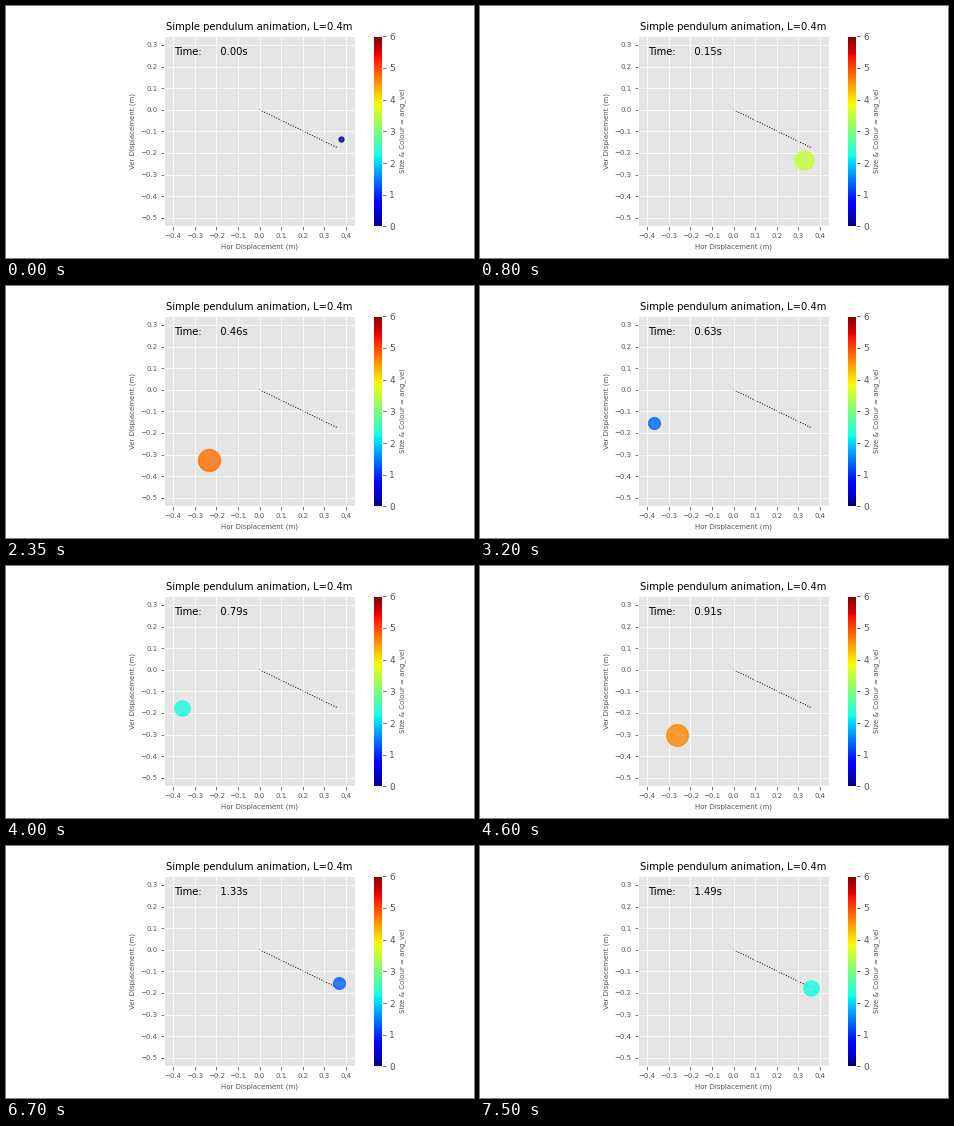
Animation of 468 by 252 pixels, one loop 7.55 s. Source, as a matplotlib script:

```python
import numpy as np
import matplotlib.pyplot as plt
from matplotlib.animation import FuncAnimation
from matplotlib.cm import ScalarMappable
from matplotlib.colors import Normalize
from matplotlib.ticker import MultipleLocator

plt.style.use("ggplot")
plt.rcParams.update({
    "font.family": "DejaVu Sans",
    "figure.subplot.bottom": 0.125,
    "figure.subplot.top": 0.88,
})

G = 9.8
L = 0.4
DT = 0.01
STEPS = 150
START = np.radians(70)
SMALL = 7


def swing():
    """Semi-implicit integration of the pendulum: angles and speeds."""
    angles, speeds = [], []
    theta, omega = START, 0.0
    for _ in range(STEPS):
        theta += omega * DT
        omega -= G / L * np.sin(theta) * DT
        angles.append(theta)
        speeds.append(abs(omega))
    return np.array(angles), np.array(speeds)


angles, speeds = swing()
xs, ys = L * np.sin(angles), -L * np.cos(angles)
norm = Normalize(0, 6)

fig, ax = plt.subplots(figsize=(6.5, 3.5), dpi=72, facecolor="white")
ax.set_aspect("equal")
ax.set_xlim(-0.44, 0.44)
ax.set_ylim(-0.54, 0.34)
for axis in (ax.xaxis, ax.yaxis):
    axis.set_major_locator(MultipleLocator(0.1))
ax.tick_params(labelsize=SMALL)
ax.set_title(f"Simple pendulum animation, L={L}m", fontsize=10)
ax.set_xlabel("Hor Displacement (m)", fontsize=SMALL)
ax.set_ylabel("Ver Displacement (m)", fontsize=SMALL)

bar = fig.colorbar(ScalarMappable(norm, "jet"), ax=ax, ticks=range(7))
bar.ax.tick_params(labelsize=9)
bar.set_label("Size & Colour = ang_vel", fontsize=SMALL)

# The rod stays at its final position, beneath the grid
ax.plot([0, xs[-1]], [0, ys[-1]], "k:", lw=1, zorder=0)
bob = ax.scatter([xs[0]], [ys[0]], s=[1], c=[0], cmap="jet", norm=norm,
                 alpha=0.8, linewidths=1.5, edgecolors="face", zorder=3)
clock = ax.text(0.05, 0.9, "", transform=ax.transAxes, fontsize=10)


def update(i):
    k = max(i - 1, 0)  # the first pose is held for two ticks
    bob.set_offsets([(xs[k], ys[k])])
    bob.set_sizes([100 * speeds[k]])
    bob.set_array(speeds[k:k + 1])
    clock.set_text(f"Time:      {k * DT:.2f}s")
    return bob, clock


anim = FuncAnimation(fig, update, frames=STEPS + 1, interval=50,
                     repeat=True, repeat_delay=0, blit=False)
plt.show()
```
